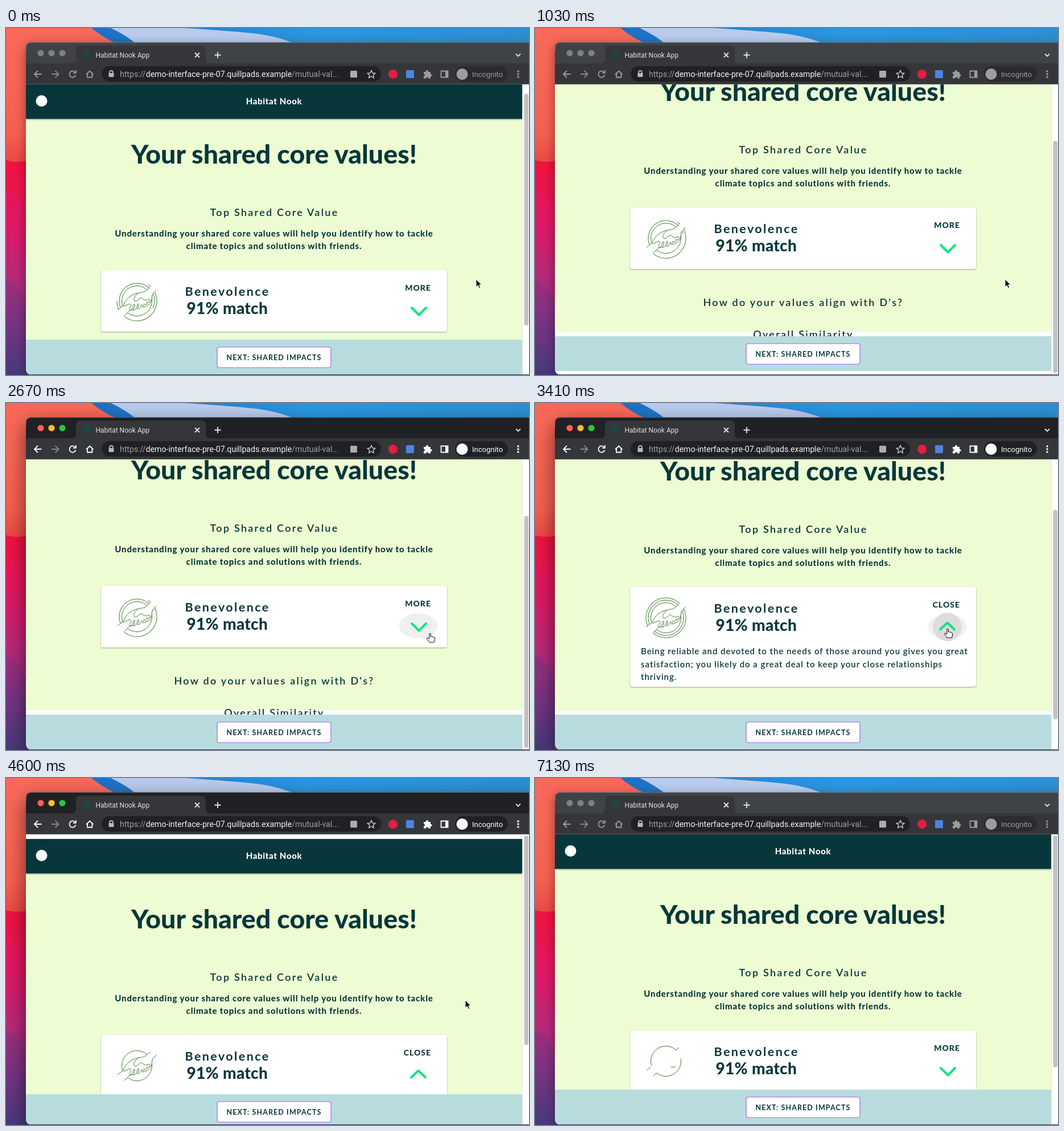
Write an HTML page that moves like this. It is 919 by 609 pixels and loops after 7150 ms.

```html
<!DOCTYPE html>
<html lang="en">
<head>
<meta charset="utf-8">
<title>Shared core values</title>
<style>
html, body { margin: 0; width: 100%; height: 100%; overflow: hidden; }
svg { display: block; width: 100%; height: 100%; }
text { white-space: pre; }
.ui { font-family: Roboto, sans-serif; }
.page { font-family: Lato, sans-serif; fill: #07373b; font-weight: 700; }
.mid { text-anchor: middle; }
.sub { font-size: 18px; font-weight: 600; letter-spacing: 2.25px; }
.lead { font-size: 15px; font-weight: 800; letter-spacing: .85px; }
.body { font-size: 15px; font-weight: 600; letter-spacing: .98px; }
.line { fill: none; stroke: currentColor; stroke-width: 1.8; }
.draw { fill: none; stroke: #3f7d2c; stroke-width: 1; }
#header rect { filter: drop-shadow(0 1.5px 1.5px rgba(0,0,0,.35)); }
#card { filter: drop-shadow(0 1px 1px rgba(0,0,0,.35)); }
</style>
</head>
<body>
<svg viewBox="0 0 919 609">
  <defs>
    <linearGradient id="warm" x2="0" y2="1">
      <stop offset="0" stop-color="#f8695a"/><stop offset=".3" stop-color="#f4604f"/>
      <stop offset=".385" stop-color="#ea4a45"/>
    </linearGradient>
    <linearGradient id="cool" x2="0" y2="1">
      <stop offset="0" stop-color="#f0123f"/><stop offset=".25" stop-color="#e2185a"/>
      <stop offset=".55" stop-color="#b52a7a"/><stop offset=".8" stop-color="#78347f"/>
      <stop offset="1" stop-color="#453a78"/>
    </linearGradient>
    <linearGradient id="sky">
      <stop offset="0" stop-color="#1d6fc2"/><stop offset=".5" stop-color="#2b97e0"/>
      <stop offset="1" stop-color="#2c8fd2"/>
    </linearGradient>
    <clipPath id="view"><path d="M35 99H919V608H45Q35 608 35 598Z"/></clipPath>
    <clipPath id="pane"><path d="M35 99H907V608H45Q35 608 35 598Z"/></clipPath>
    <clipPath id="cardClip"><rect id="cardMask" x="167" y="443" width="608"/></clipPath>
  </defs>

  <rect width="919" height="609" fill="url(#warm)"/>
  <path d="M0 232Q20 238 40 232H919V609H0Z" fill="url(#cool)"/>
  <path d="M0 284Q24 292 40 330V420Q20 380 0 384Z" fill="#e0187a" opacity=".2"/>
  <path d="M0 440Q24 450 40 500V609H0Z" fill="#4b3a86" opacity=".2"/>
  <path d="M150 0H919V30H205Q180 24 150 0Z" fill="url(#sky)"/>
  <path d="M184 0H312Q380 4 430 9T512 30H232Q210 12 184 0Z" fill="#b9cbec"/>

  <path id="shadow" d="M45 25H930V608H45Q35 608 35 598V35Q35 25 45 25Z" fill="#35363a"/>
  <g class="ui">
    <path id="strip" d="M35 62V35Q35 25 45 25H919V62Z"/>
    <path d="M115 62Q123 62 123 54V39Q123 31 131 31H343Q351 31 351 39V54Q351 62 359 62Z" fill="#35363a"/>
    <rect x="35" y="62" width="884" height="37" fill="#35363a"/>
    <path d="M35.500 40V35Q35.500 25.500 45 25.500H919" fill="none" stroke="#fff" stroke-opacity=".22"/>
    <g id="lights"><circle cx="61" cy="44" r="5.6"/><circle cx="80" cy="44" r="5.6"/><circle cx="99" cy="44" r="5.6"/></g>
    <circle cx="142" cy="47" r="7" fill="#1c4645"/>
    <text x="157.500" y="51.500" font-size="12" fill="#dfe1e5">Habitat Nook App</text>
    <path d="M332 43.500l8 8m0-8l-8 8M366.500 47.500h11m-5.500-5.500v11M896 45.500l4 4 4-4" class="line" style="color:#e4e5e8"/>
    <rect x="168" y="67" width="491" height="27" rx="13.500" fill="#202124"/>
    <path d="M182 80v-2a3 3 0 0 1 6 0v2" class="line" style="color:#b5b8bc"/>
    <rect x="180.500" y="79" width="9" height="7" rx="1" fill="#b5b8bc"/>
    <text x="200" y="85.500" font-size="14.100" fill="#9aa0a6">https://<tspan fill="#f1f2f4">demo-interface-pre-07.quillpads.example</tspan>/mutual-val...</text>
    <rect x="605" y="75" width="12" height="12" rx="1.500" fill="#a9acb0"/>
    <path d="M642 74.500l2 4.500 4.800.500-3.600 3.200 1 4.800-4.200-2.500-4.200 2.500 1-4.800-3.600-3.200 4.800-.500Z" class="line" style="color:#d4d6d9;stroke-width:1.3"/>
    <circle cx="680" cy="81" r="8" fill="#e0203c"/>
    <rect x="703" y="74" width="14" height="14" rx="1.500" fill="#4a86e0"/>
    <g id="nav">
      <path class="line" d="M62.500 81H50.500M56 75l-6 6 6 6"/>
      <path class="line" d="M80 81H92M86.500 75l6 6-6 6" style="color:#85888c"/>
      <path class="line" d="M121.500 77.500A5.600 5.600 0 1 0 122.500 82.500M122.800 74v4.800h-4.800"/>
      <path class="line" d="M141 81.500l6.200-6 6.200 6M143 80v6.500h8.400V80"/>
      <path d="M734 77h4v-1a2 2 0 0 1 4 0v1h4v4h.500a2 2 0 0 1 0 4H746v3.500h-3.500a2.200 2.200 0 0 0-4.400 0H734v-4a2 2 0 0 0 0-4Z" fill="currentColor"/>
      <path d="M764.500 75.500h12v11h-12Z" class="line"/>
      <path d="M772 75h5v12h-5Z" fill="currentColor"/>
      <rect id="badge" x="789" y="67" width="93" height="27" rx="13.500"/>
      <circle cx="801.500" cy="81" r="10" fill="currentColor"/>
      <text x="819" y="85.500" font-size="13" fill="currentColor">Incognito</text>
      <path d="M898.500 74.500h3v3h-3zM898.500 79.500h3v3h-3zM898.500 84.500h3v3h-3z" fill="currentColor"/>
    </g>
    <path d="M35 98.500H919" stroke="#56595c"/>
  </g>

  <g clip-path="url(#view)">
    <rect x="35" y="99" width="884" height="510" fill="#fff"/>
    <path d="M907.500 99V609" stroke="#e6e6e6"/>
    <rect id="thumb" x="910.500" width="7.500" rx="3.750" fill="#c1c1c1"/>
  </g>

  <g clip-path="url(#pane)" class="page">
    <g id="scroll">
      <rect x="35" y="99" width="872" height="562" fill="#edfcd2"/>
      <text class="mid" x="471" y="256" font-size="46.500" font-weight="800">Your shared core values!</text>
      <text class="mid sub" x="471.500" y="348">Top Shared Core Value</text>
      <text class="mid lead" x="471" y="384">Understanding your shared core values will help you identify how to tackle</text>
      <text class="mid lead" x="471" y="406">climate topics and solutions with friends.</text>
      <rect id="card" x="167" y="443" width="608" rx="4" fill="#fff"/>
      <g id="emblem" transform="translate(230 497)">
        <circle class="draw" r="26.500"/>
        <circle class="draw ring" r="31" pathLength="1" transform="rotate(150)"/>
        <circle class="draw ring" r="35" pathLength="1" transform="rotate(-55)"/>
        <path d="M-36 17L-24 8C-20-2-14-8-4-12S12-14 16-18L26-26 36-20 27-11C26-2 24 6 18 10L8 12C0 16-10 22-15 19L-24 28Z" fill="#fff"/>
        <g id="arms">
          <path class="draw" pathLength="1" d="M-34 16L-24 8C-20-2-14-8-4-12S12-14 16-18L23-24"/>
          <path class="draw" pathLength="1" d="M-22 26L-15 19C-12 15-8 17-5 15M9 11C18 10 24 6 26-2L27-11 34-19"/>
        </g>
        <g id="fingers">
          <path class="draw" pathLength="1" d="M2-13C-4-9-7-3-4 0S4-4 8-6C12-1 17 0 22-3C25 1 21 4 17 2C20 6 15 8 12 5C13 9 10 10 8 8"/>
          <path class="draw" pathLength="1" d="M-24 10L-15 6C-12 4-9 6-11 10S-15 15-12 16-7 12-6 8-3 6-4 10-8 16-5 16 0 11 1 7 4 5 3 9-1 14 2 14 7 10 8 6"/>
        </g>
      </g>
      <text x="314.500" y="488" font-size="21.500" letter-spacing="2.400">Benevolence</text>
      <text x="317.500" y="520" font-size="28" font-weight="800" letter-spacing=".300">91% match</text>
      <text id="label" x="747" y="479" font-size="14" font-weight="800" letter-spacing="1" text-anchor="end"></text>
      <ellipse id="hover" cx="724.500" cy="513" rx="34" ry="22" fill="#f0f0f0"/>
      <circle id="ripple" cx="724.500" cy="513" fill="#dcdcdc"/>
      <path id="chevron" fill="none" stroke="#0ae681" stroke-width="4" stroke-linecap="round" stroke-linejoin="round"/>
      <g id="detail" clip-path="url(#cardClip)">
        <text class="body" x="186" y="561">Being reliable and devoted to the needs of those around you gives you great</text>
        <text class="body" x="186" y="583.500">satisfaction; you likely do a great deal to keep your close relationships</text>
        <text class="body" x="186" y="606">thriving.</text>
      </g>
      <g id="below">
        <text class="mid sub" x="471.500" y="616">How do your values align with D's?</text>
        <text class="mid sub" x="471.500" y="672">Overall Similarity</text>
      </g>
    </g>
    <g id="header">
      <rect x="35" y="99" width="872" height="60.500" fill="#08373b"/>
      <circle cx="62.500" cy="128" r="10" fill="#fff"/>
      <text class="mid" x="471" y="133.500" font-size="15" font-weight="800" letter-spacing=".650" fill="#fff">Habitat Nook</text>
    </g>
    <g id="footer">
      <rect x="35" y="607" width="872" height="20" fill="#fff"/>
      <rect x="35" y="547" width="872" height="61" fill="#b8dcde"/>
      <rect x="371" y="560" width="200" height="36" rx="3.500" fill="#fff" stroke="#a562f2" stroke-width="1.200"/>
      <text class="mid" x="471" y="583" font-size="12.500" letter-spacing="1.100">NEXT: SHARED IMPACTS</text>
    </g>
  </g>

  <path id="arrow" d="M0 0V13.500L3.200 10.600 5.400 15.600 7.700 14.600 5.500 9.800H9.800Z" fill="#000" stroke="#fff"/>
  <path id="hand" d="M-1.200 1Q0-.800 1.200 1V6Q3 4.800 3.800 6.300 5.500 5.500 6.300 7 8.500 6.600 8.500 9V12Q8 14 7 16H-1Q-3 13-3 13L-5.800 9.500Q-5.500 7-3 8.500L-1.200 10Z" fill="#fff" stroke="#000"/>
</svg>
<script>
const $ = id => document.getElementById(id);
const LOOP = 7150, STEP = 148.4, VIEW = 510, TRACK = 504;

const scrollKeys = [[0, 18], [1, 32], [2, 52], [4, 93], [5, 109], [6, 121], [7, 128], [8, 130],
  [12, 124], [14, 122], [20, 122], [21, 121], [25, 119], [26, 98], [28, 42], [30, -5], [31, -8], [33, -5], [36, 0]];
const hideKeys = [[5, 0], [7, 1], [25, 1], [27, 0]];
const openKeys = [[20, 0], [23, 1], [43, 1], [46, 0]];
const pointerKeys = [[14, 826, 441], [18, 745, 404], [20, 725, 396], [24, 725, 396], [28, 795, 391], [31, 807, 390],
  [34, 807, 390], [38, 816, 580], [39, 815, 589], [40, 806, 576], [43, 725, 506], [45, 725, 506], [47, 765, 530]];

const clamp = (v, a = 0, b = 1) => Math.min(b, Math.max(a, v));

function at(keys, step, col = 1) {
  const n = keys.findIndex(k => k[0] >= step);
  if (n === 0) return keys[0][col];
  if (n < 0) return keys[keys.length - 1][col];
  const a = keys[n - 1], b = keys[n];
  return a[col] + (b[col] - a[col]) * (step - a[0]) / (b[0] - a[0]);
}

const move = (id, x, y) => $(id).setAttribute('transform', `translate(${x} ${y})`);
const show = (id, on) => $(id).style.display = on ? '' : 'none';
const set = (id, name, value) => $(id).setAttribute(name, value);

function drawWindow(active) {
  const lights = active ? ['#ff5f57', '#febc2e', '#28c840'] : Array(3).fill('#7e8184');
  [...$('lights').children].forEach((dot, i) => dot.setAttribute('fill', lights[i]));
  set('strip', 'fill', active ? '#202124' : '#3f4346');
  set('badge', 'fill', active ? '#202124' : '#2a2b2e');
  $('nav').style.color = active ? '#fff' : '#9a9da1';
  $('shadow').style.filter = active
    ? 'drop-shadow(0 12px 16px rgba(0,0,0,.55))' : 'drop-shadow(0 5px 9px rgba(0,0,0,.4))';
}

// The arms grow inwards from both ends, the other strokes from their start.
function drawEmblem(step) {
  const p = (step + 9) % 19 / 19;
  const hands = p < .9 ? clamp(p * 9.5) : clamp((1 - p) * 10);
  const rings = p < .75 ? clamp((p - .2) / .42) : clamp((.95 - p) / .2);
  const arms = .25 + .75 * hands;
  for (const arm of $('arms').children)
    arm.style.strokeDasharray = `${arms / 2} ${1 - arms} ${arms / 2} 0`;
  const trace = (path, part) => {
    path.style.strokeDasharray = `${part} 2`;
    path.style.opacity = part > 0 ? 1 : 0;
  };
  for (const finger of $('fingers').children) trace(finger, hands);
  for (const ring of document.querySelectorAll('.ring')) trace(ring, rings);
}

function render(ms) {
  const step = Math.min(48, Math.floor((ms % LOOP + 10) / STEP));
  const y = at(scrollKeys, step), open = at(openKeys, step), grow = 67 * open;
  const content = 632 + grow, limit = content - VIEW;
  const inside = clamp(y, 0, limit), bounce = inside - y;
  const closeLabel = step >= 21 && step < 44;
  const px = at(pointerKeys, step), py = at(pointerKeys, step, 2);
  const overToggle = Math.hypot((px - 724.5) / 34, (py + y - 513) / 22) < 1;

  drawWindow(step >= 18 && step < 48);
  drawEmblem(step);

  move('scroll', 0, -y);
  move('header', 0, bounce - 66 * at(hideKeys, step));
  move('footer', 0, bounce);
  move('below', 0, grow);
  set('card', 'height', 108 + grow);
  set('cardMask', 'height', 108 + grow);
  show('detail', open > 0);

  $('label').textContent = closeLabel ? 'CLOSE' : 'MORE';
  set('chevron', 'd', closeLabel ? 'M712 517.500L724.500 505.500 737 517.500' : 'M713 509L725.500 521.500 738 509');

  const sinceClick = step < 40 ? step - 21 : step - 44;
  show('hover', overToggle && step < 48);
  show('ripple', overToggle && sinceClick >= 0 && sinceClick < 3);
  set('ripple', 'r', clamp(14 + sinceClick * 5.5, 0, 25));

  set('thumb', 'height', TRACK * VIEW / content);
  set('thumb', 'y', 101 + inside * TRACK / content);

  show('arrow', !overToggle && step < 48);
  show('hand', overToggle && step < 48);
  move('arrow', px, py);
  move('hand', px, py);
}

const start = performance.now();
function tick() {
  render(performance.now() - start);
  requestAnimationFrame(tick);
}
tick();
</script>
</body>
</html>
```
